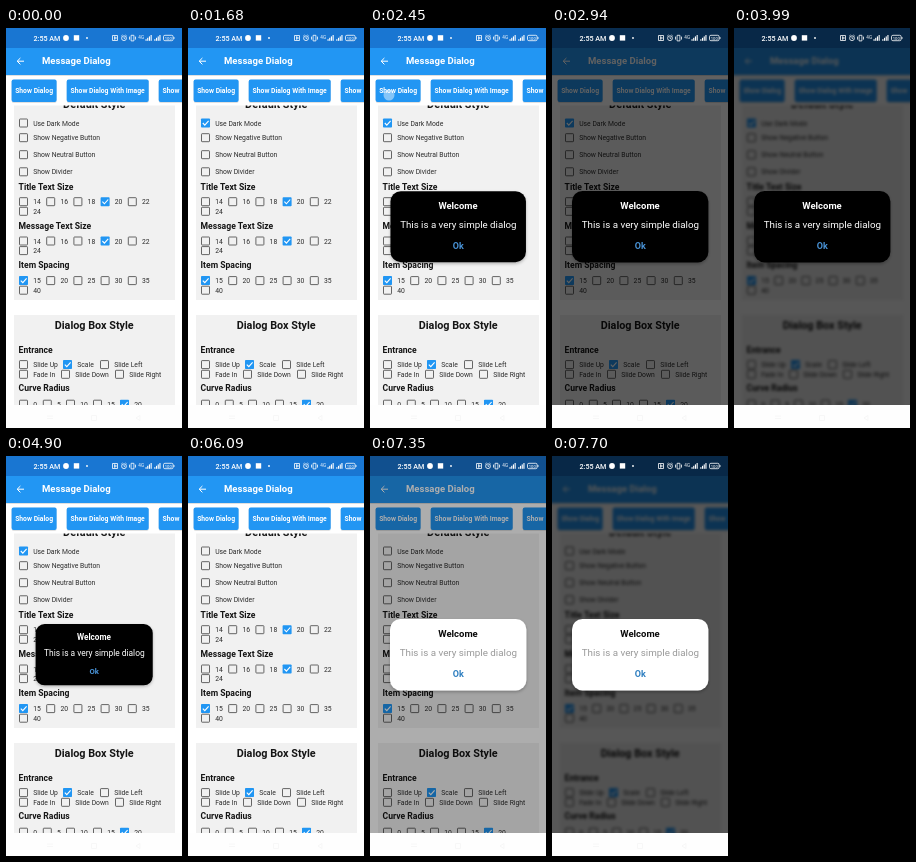
These frames come from a looping animation (176 px wide and 400 px high, 8000 ms). An HTML page:

```html
<!DOCTYPE html>
<html lang="en">
<head>
<meta charset="utf-8">
<title>Message Dialog</title>
<style>
html, body { margin: 0; width: 100%; height: 100%; overflow: hidden; background: #fff; }
svg { display: block; width: 176px; height: 400px; font-family: Roboto, sans-serif; }
.m { font-weight: 500; }
.b { font-weight: 700; }
.mid { text-anchor: middle; }
</style>
</head>
<body>
<svg id="stage" viewBox="0 0 176 400">
  <defs>
    <clipPath id="view"><rect y="20" width="176" height="357"/></clipPath>
    <clipPath id="list"><rect x="-10" y="77.4" width="196" height="310"/></clipPath>
    <filter id="blur" filterUnits="userSpaceOnUse" x="-10" y="10" width="196" height="380" color-interpolation-filters="sRGB">
      <feGaussianBlur id="soft" stdDeviation="0"/>
    </filter>
    <filter id="lift" x="-20%" y="-30%" width="140%" height="170%">
      <feDropShadow dx="0" dy="1.6" stdDeviation="1.8" flood-opacity=".26"/>
    </filter>
    <filter id="low" x="-20%" y="-30%" width="140%" height="170%">
      <feDropShadow dx="0" dy=".6" stdDeviation=".5" flood-opacity=".2"/>
    </filter>
  </defs>
  <rect width="176" height="400" fill="#fff"/>
  <g clip-path="url(#view)"><g id="page"></g></g>
  <rect width="176" height="20" fill="#1976d2"/>
  <rect id="scrim" width="176" height="377" fill="#000"/>
  <g id="status"></g>
  <rect y="377" width="176" height="23" fill="#fefefe"/>
  <path d="M41 388h6M41 390.5h6M85.5 387.5h5v5h-5zM134 387.5l-4 2.5 4 2.5z" fill="none" stroke="#f7f7f7"/>
  <g id="dialog">
    <rect id="panel" x="20" y="163" width="136.4" height="71.4" rx="10.5" filter="url(#lift)"/>
    <rect id="press" x="73" y="207" width="31" height="22" rx="2" fill="#3d92dc"/>
    <text id="head" class="b mid" x="88" y="181.2" font-size="9.5">Welcome</text>
    <text id="body" class="mid" x="88.4" y="200" font-size="9.8">This is a very simple dialog</text>
    <text id="ok" class="b mid" x="88.2" y="220.8" font-size="9">Ok</text>
  </g>
</svg>
<script>
const $ = id => document.getElementById(id);
const BLUE = '#2196f3', INK = '#2b2b2b';
const LOOP = 8000;

const rect = (x, y, w, h, fill, more = '') =>
  `<rect x="${x}" y="${y}" width="${w}" height="${h}" fill="${fill}" ${more}/>`;
const text = (x, y, size, str, fill = INK, cls = '') =>
  `<text x="${x}" y="${y}" font-size="${size}" fill="${fill}" class="${cls}">${str}</text>`;
const line = (d, stroke, width) =>
  `<path d="${d}" fill="none" stroke="${stroke}" stroke-width="${width}"/>`;
const heading = (y, str) => text(12.6, y, 8.6, str, '#151515', 'b');
const title = (y, str) => text(88.2, y, 10.8, str, '#151515', 'b mid');

const onBox = (x, y) => rect(x, y - 4.5, 9, 9, BLUE, 'rx=".8"') +
  line(`M${x + 1.8} ${y}l2 2.1 3.8-4.3`, '#fff', 1.1);
const offBox = (x, y) => rect(x + .5, y - 4, 8, 8, 'none', 'rx=".6" stroke="#555" stroke-width=".9"');
const option = (x, y, label, on) =>
  (on ? onBox(x, y) : offBox(x, y)) + text(x + 14.2, y + 2.5, 6.8, label);

// Five values in one row, the sixth wraps to the next
const values = (y, list, chosen) => list.map((v, i) =>
  option(i < 5 ? 13 + i * 27.2 : 13, i < 5 ? y : y + 9.6, v, v === chosen)).join('');

const button = (x, w, label, cx) => rect(x, 51.5, w, 22.5, BLUE, 'rx="2" filter="url(#low)"') +
  text(cx, 65.4, 6.8, label, '#fff', 'b mid');

function buildPage() {
  const sizes = [14, 16, 18, 20, 22, 24];
  $('page').innerHTML =
    rect(-10, 10, 196, 380, '#fff') +
    `<g clip-path="url(#list)">` +
      rect(8, 70, 161, 202, '#f1f1f1') +
      rect(8, 287, 161, 110, '#f1f1f1') +
      title(80.4, 'Default Style') +
      option(13, 95, 'Use Dark Mode') +
      `<g id="dark">${rect(12.5, 90, 10, 10, '#f1f1f1') + onBox(13, 95)}</g>` +
      option(13, 109.7, 'Show Negative Button') +
      option(13, 126.7, 'Show Neutral Button') +
      option(13, 143.8, 'Show Divider') +
      heading(161.6, 'Title Text Size') + values(173.7, sizes, 20) +
      heading(200.9, 'Message Text Size') + values(213, sizes, 20) +
      heading(240.3, 'Item Spacing') + values(252.6, [15, 20, 25, 30, 35, 40], 15) +
      title(301.2, 'Dialog Box Style') +
      heading(324.5, 'Entrance') +
      option(13, 336.6, 'Slide Up') + option(57, 336.6, 'Scale', true) + option(94, 336.6, 'Slide Left') +
      option(13, 346.3, 'Fade In') + option(55, 346.3, 'Slide Down') + option(109, 346.3, 'Slide Right') +
      heading(363.4, 'Curve Radius') +
      [[13, 0], [36.8, 5], [60, 10], [87, 15], [114, 20]]
        .map(([x, v]) => option(x, 376.2, v, v === 20)).join('') +
    `</g>` +
    rect(-10, 10, 196, 37, BLUE, 'filter="url(#low)"') +
    line('M18 33.2H11.2M14.4 30L11.2 33.2L14.4 36.4', '#fff', 1) +
    text(36, 36.3, 9.55, 'Message Dialog', '#fff', 'b') +
    button(5.6, 45, 'Show Dialog', 28.1) +
    button(60.7, 82, 'Show Dialog With Image', 101.7) +
    button(152.7, 40, '', 170) +
    text(156.6, 65.4, 6.8, 'Show', '#fff', 'b') +
    `<circle id="touch" cx="19" cy="67" r="5.5" fill="#fff"/>`;
}

function buildStatus() {
  const bars = x => [0, 1, 2, 3].map(i =>
    rect(x + i * 1.7, 11.2 - i * 1.4, 1.1, 1.6 + i * 1.4, '#fff')).join('');
  $('status').innerHTML =
    text(27.4, 12.6, 7.2, '2:55 AM', '#fff', 'm') +
    '<circle cx="60" cy="10" r="2.9" fill="#fff"/>' +
    rect(67.8, 7.2, 5.4, 5.4, '#fff') +
    '<circle cx="81" cy="10" r=".9" fill="#fff"/>' +
    line('M106.5 7.5h5v5h-5zM108.5 8.6v2.8l2-1.4z', '#fff', .8) +
    '<circle cx="118" cy="10.2" r="2.4" fill="none" stroke="#fff" stroke-width=".8"/>' +
    line('M118 8.8v1.6h1.2M115.3 8l1.2-1.1M120.7 8l-1.2-1.1', '#fff', .7) +
    line('M123.5 8.6v3M129.5 8.6v3M125.1 7.3h2.8v5.6h-2.8z', '#fff', .8) +
    text(132.3, 11, 4.6, '4G', '#fff') +
    bars(139.5) + bars(148.3) +
    rect(157.5, 7.3, 9.6, 5.4, 'none', 'rx="1.4" stroke="#fff" stroke-width=".8"') +
    text(162.3, 11.6, 4.2, '100', '#fff', 'mid') +
    rect(167.6, 9, .8, 2, '#fff');
}

const ramp = (t, a, b) => Math.min(1, Math.max(0, (t - a) / (b - a)));
const easeOut = p => 1 - (1 - p) ** 3;
const easeIn = p => p ** 3;
const show = (id, on) => $(id).setAttribute('display', on ? 'inline' : 'none');
const set = (id, name, v) => $(id).setAttribute(name, v);

const OPEN = [2030, 6580], CLOSE = 4270;

function theme(dark) {
  set('panel', 'fill', dark ? '#000' : '#fff');
  set('head', 'fill', dark ? '#fff' : '#0a0a0a');
  set('body', 'fill', dark ? '#fff' : '#999');
  set('ok', 'fill', dark ? '#4892d6' : '#2f7fc0');
}

function draw(t) {
  const start = t >= OPEN[1] ? OPEN[1] : OPEN[0];
  const dt = t - start;
  const closing = start === OPEN[0] && t >= CLOSE;
  const out = t - CLOSE;

  // The backdrop darkens first, then blurs; closing runs it backwards
  const fade = closing ? 1 - ramp(out, 100, 390) : ramp(dt, 620, 930);
  const blur = 1.6 * (closing ? 1 - ramp(out, 0, 140) : ramp(dt, 920, 1110));
  const scale = closing ? 1 - easeIn(ramp(out, 480, 770)) : easeOut(ramp(dt, 120, 490));

  set('scrim', 'opacity', .66 * fade);
  if (blur > .02) {
    set('soft', 'stdDeviation', blur);
    set('page', 'filter', 'url(#blur)');
  } else {
    $('page').removeAttribute('filter');
  }

  show('dialog', scale > .005);
  set('dialog', 'transform', `translate(88 198.5) scale(${scale}) translate(-88 -198.5)`);
  theme(start === OPEN[0]);

  show('dark', t >= 980 && t < 5740);
  set('touch', 'opacity', .45 * ramp(dt, 0, 70) * (1 - ramp(dt, 430, 560)));
  set('press', 'opacity', closing ? .22 * ramp(out, 0, 70) * (1 - ramp(out, 300, 480)) : 0);
}

buildPage();
buildStatus();
const begin = performance.now();
function tick() {
  draw((performance.now() - begin) % LOOP);
  requestAnimationFrame(tick);
}
tick();
</script>
</body>
</html>
```
